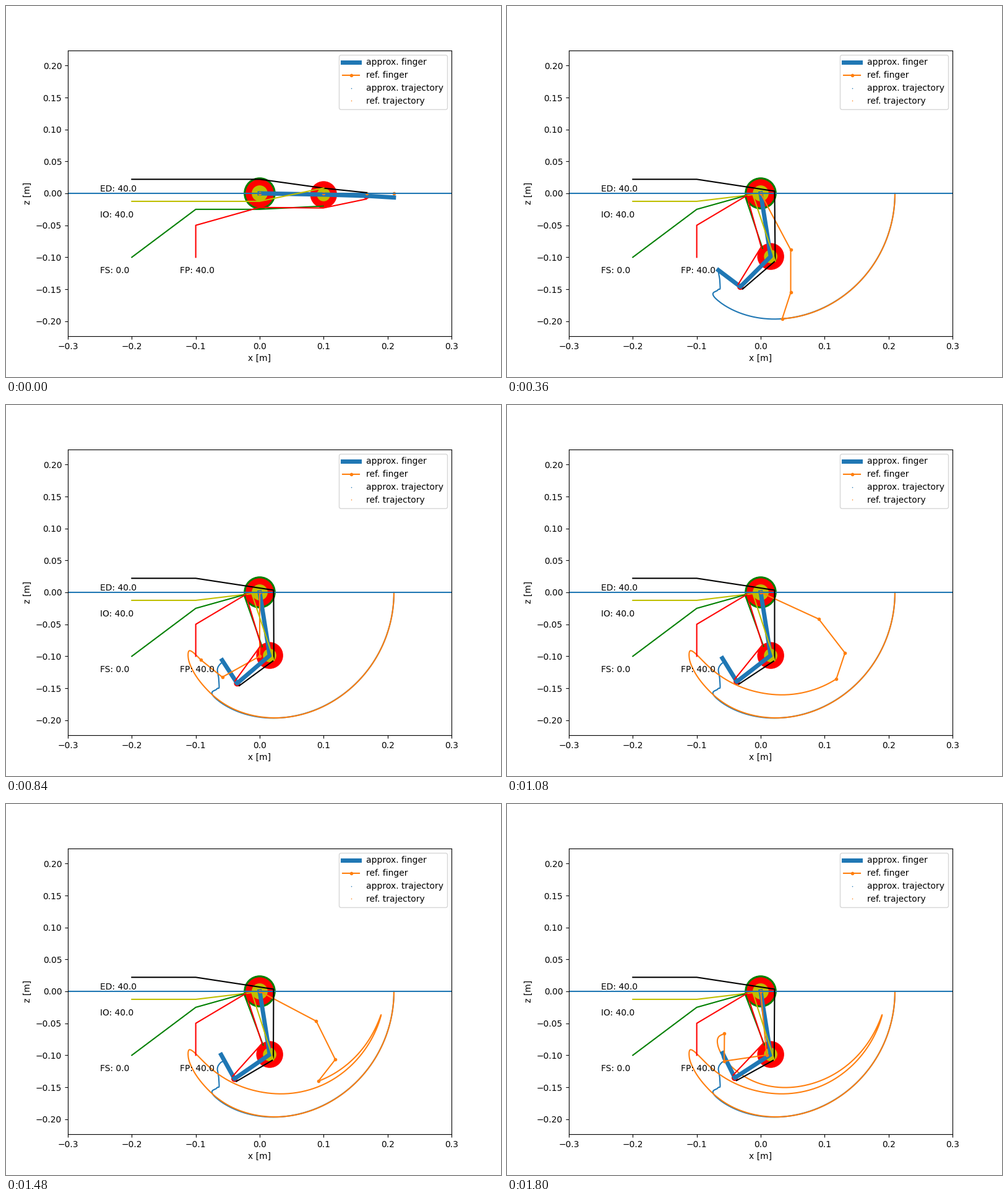
Animation of 800x600 px, one loop 1.84 s. Source, as a matplotlib script:

```python
import numpy as np
import matplotlib.pyplot as plt
from matplotlib.animation import FuncAnimation
from matplotlib.patches import Circle

FRAMES = 46
LINKS = np.array([0.1, 0.067, 0.043])

# time in steps, then the three joint angles in degrees
REF = np.array([
    (0, 0, 0, 0), (5, 28.7, 11.9, 6.2), (9, 62, 28, 18), (11, 76, 39, 28),
    (13, 86, 50, 38.4), (15, 93, 55, 47), (17, 98, 58, 56), (19, 99, 61, 65),
    (21, 90, 60.8, 68), (24, 57, 49, 64), (27, 24.7, 27.6, 56.1),
    (32, -4, 10.7, 50.3), (37, 27.8, 35.8, 64.4), (41, 60, 61, 74),
    (43, 80, 80, 80), (44, 84, 84, 87), (45, 84.7, 87, 98.8)])
APPROX = np.array([
    (-0.5, 0, 0, 0), (0, 1.1, 0.6, 1.7), (1, 12, 5, 2.5), (2, 36, 15, 9),
    (3, 66, 30, 20), (4, 84.5, 40, 42), (5, 83.6, 38.6, 63.9),
    (6, 82, 39.5, 68), (7, 81, 45, 75), (9, 81, 54, 82), (11, 81, 56, 92),
    (13, 81, 55.7, 97), (21, 81, 58.4, 97.6), (27, 81, 61.3, 96.1),
    (37, 81, 64.3, 95.8), (45, 81, 65.9, 96.8)])


def angles(keys, t):
    """Absolute link angles (radians) by cubic Hermite interpolation."""
    t = np.atleast_1d(t).astype(float)
    time, q = keys[:, 0], np.cumsum(keys[:, 1:], axis=1)
    slope = np.gradient(q, time, axis=0)
    i = np.clip(np.searchsorted(time, t, side="right") - 1, 0, len(time) - 2)
    h = (time[i + 1] - time[i])[:, None]
    u = (t - time[i])[:, None] / h
    out = ((2 * u**3 - 3 * u**2 + 1) * q[i] + (u**3 - 2 * u**2 + u) * h * slope[i]
           + (3 * u**2 - 2 * u**3) * q[i + 1] + (u**3 - u**2) * h * slope[i + 1])
    return np.radians(out)


def joints(ang):
    """Joint positions, shape (n, 4, 2); positive angles bend downwards."""
    steps = np.stack([LINKS * np.cos(ang), -LINKS * np.sin(ang)], axis=-1)
    origin = np.zeros((len(ang), 1, 2))
    return np.concatenate([origin, np.cumsum(steps, axis=1)], axis=1)


# colour, fixed guide points, signed pulley radius at each joint
TENDONS = [
    ("k", [(-0.2, 0.022), (-0.1, 0.022)], [0.022, 0.01, 0.005]),
    ("y", [(-0.2, -0.0125), (-0.1, -0.0125)], [-0.0125, 0.0103]),
    ("g", [(-0.2, -0.1), (-0.1, -0.025)], [-0.025, -0.018]),
    ("r", [(-0.1, -0.1), (-0.1, -0.05)], [-0.022, -0.021, -0.005]),
]
# joint, radius, colour
PULLEYS = [(0, 0.025, "g"), (0, 0.022, "r"), (0, 0.0125, "y"),
           (1, 0.021, "r"), (1, 0.0105, "y"), (2, 0.005, "r")]
LABELS = [(-0.25, 0.0025, "ED: 40.0"), (-0.25, -0.0375, "IO: 40.0"),
          (-0.25, -0.125, "FS: 0.0"), (-0.125, -0.125, "FP: 40.0")]

fig = plt.figure(figsize=(8, 6), dpi=100)
ax = fig.add_axes([0.125, 0.11, 0.775, 0.77])
half = 0.3 * 462 / 620
ax.set(xlim=(-0.3, 0.3), ylim=(-half, half), xlabel="x [m]", ylabel="z [m]")
ax.set_xticks(np.arange(-3, 4) / 10)
ax.set_yticks(np.arange(-4, 5) / 20)

pulleys = []
for joint, radius, color in PULLEYS:
    disc = ax.add_patch(Circle((0, 0), radius, color=color, lw=0, zorder=1))
    pulleys.append((joint, disc))

approx_line, = ax.plot([], [], "C0-", lw=5, label="approx. finger")
ref_line, = ax.plot([], [], "C1.-", lw=1.5, label="ref. finger")
for color, name in (("C0", "approx. trajectory"), ("C1", "ref. trajectory")):
    ax.plot([], [], "o", color=color, ms=1.1, mew=0, label=name)
approx_path, = ax.plot([], [], "C0-", lw=1.5, zorder=1.5)
ref_path, = ax.plot([], [], "C1-", lw=1.5, zorder=1.6)
ax.axhline(0, color="C0", lw=1.5)
tendons = [ax.plot([], [], color=color, lw=1.5)[0] for color, _, _ in TENDONS]
for x, z, label in LABELS:
    ax.text(x, z, label)
ax.legend(loc="upper right")


def show_finger(keys, line, path, t):
    ang = angles(keys, t)
    pts = joints(ang)[0]
    line.set_data(*pts.T)
    start = keys[0, 0]
    times = np.linspace(start, t, int((t - start) * 20) + 2)
    path.set_data(*joints(angles(keys, times))[:, 3].T)
    return ang[0], pts


def update(frame):
    show_finger(REF, ref_line, ref_path, frame)
    ang, pts = show_finger(APPROX, approx_line, approx_path, frame)
    for joint, disc in pulleys:
        disc.center = pts[joint]
    normals = np.stack([np.sin(ang), np.cos(ang)], axis=1)[[0, 1, 1]]
    for line, (_, guides, radii) in zip(tendons, TENDONS):
        wraps = [pts[j] + r * normals[j] for j, r in enumerate(radii)]
        line.set_data(*np.array(guides + wraps).T)
    return []


anim = FuncAnimation(fig, update, frames=FRAMES, interval=40,
                     repeat=True, repeat_delay=0, blit=False)
plt.show()
```
